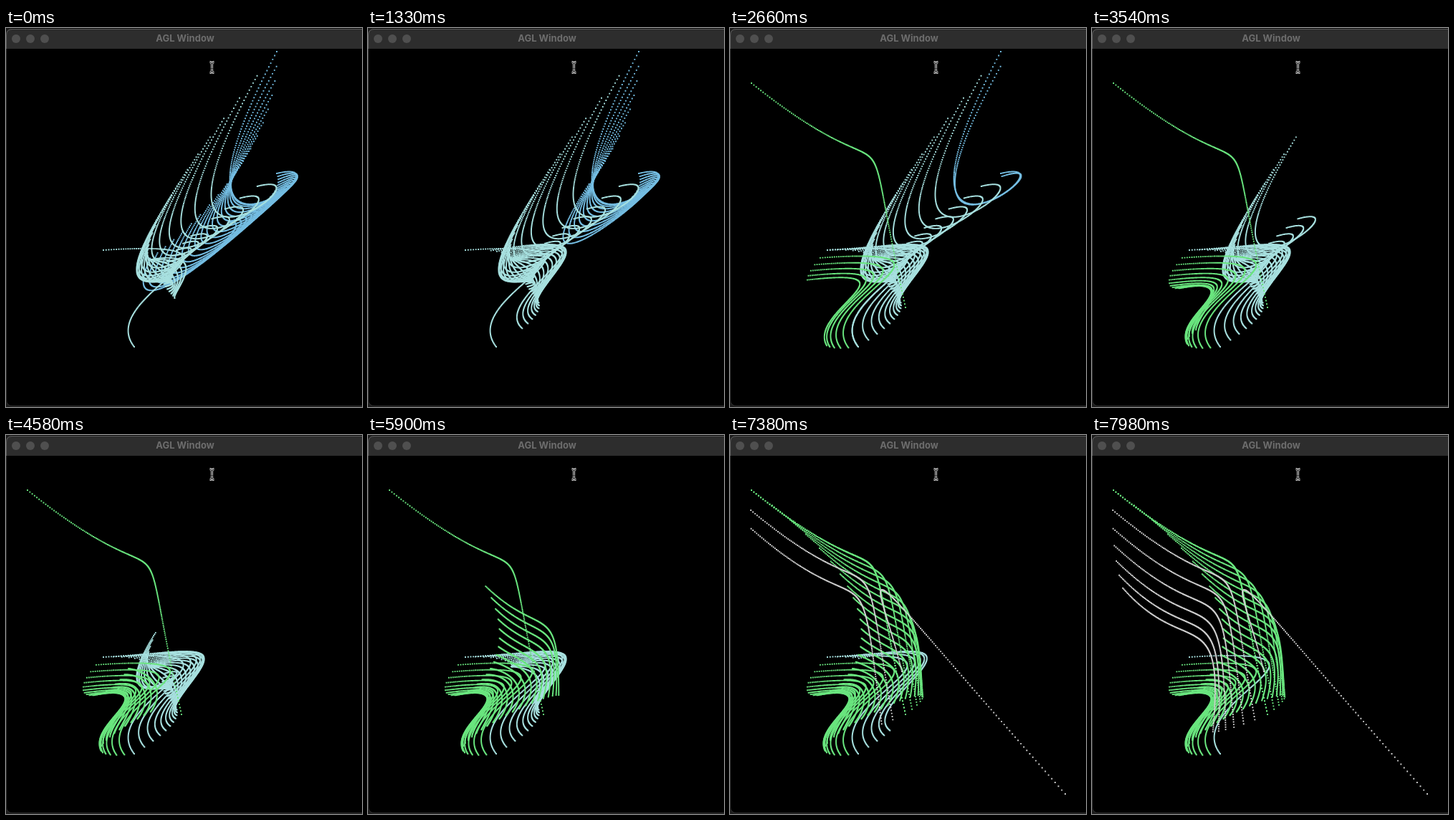
Recreate the animation shown at these times as an HTML page with a canvas. Size 497 px wide and 529 px high, loop 8 s.

```html
<!DOCTYPE html>
<html lang="en">
<head>
<meta charset="utf-8">
<title>AGL Window</title>
<style>
  html, body { margin: 0; width: 100%; height: 100%; overflow: hidden; background: #1c1c1c; }
  canvas, svg { position: absolute; left: 0; top: 0; display: block; }
  canvas { border-radius: 10px 0 0 10px; }
  text { font: 700 13px Inter, "Liberation Sans", sans-serif; fill: #6d6d6d; text-anchor: middle; }
</style>
</head>
<body>
<canvas id="stage" width="497" height="528"></canvas>
<svg width="497" height="529" viewBox="0 0 497 529" fill="none">
  <path d="M0 29V10Q0 1 9 1H497V29Z" fill="#2d2d2d"/>
  <path d="M497 527.5H9Q.5 527.5 .5 519V29" stroke="#303030"/>
  <path d="M.5 29V10Q.5 1.5 9 1.5H497" stroke="#606060"/>
  <g fill="#4f4f4f">
    <circle cx="14" cy="15" r="6"/><circle cx="34" cy="15" r="6"/><circle cx="54" cy="15" r="6"/>
  </g>
  <text x="250" y="19">AGL Window</text>
  <defs>
    <path id="beam" d="M284.5 47.5Q287.5 47.5 287.5 51Q287.5 47.5 290.5 47.5M287.5 51V59M286.5 56.5H288.5M284.5 62.5Q287.5 62.5 287.5 59Q287.5 62.5 290.5 62.5"/>
  </defs>
  <use href="#beam" stroke="#dcdcdc" stroke-width="3"/>
  <use href="#beam" stroke="#000"/>
</svg>
<script>
const LOOP = 8000, FIRST = 140, STEP = 147.7;
const TRAIL = 43;        // curves kept on screen
const PERIOD = 35;       // curves per colour
const OFFSET = 57;       // curves drawn before the loop begins
const DOTS = 200, SIZE = 1.9;
const COLORS = ["#74bde2", "#a7e0df", "#69e57e", "#cfcfcf"];
const CENTER = [248, 279];

// Four handles shape the curve. Each travels along chained Bézier legs:
// two bends, then a stop that also starts the next leg.
const handles = [
  [CENTER, [0, 440], [385, 270], [378, 33], [50, 430], [306, 302], [136, 310],
    [8, 440], [378, 322], [30, 77], [13, 408], CENTER, [468, 501]],
  [CENTER, [20, 600], [230, 368], [184, 400], [-110, 560], [462, 170], [391, 294],
    [38, 416], [279, 293], [254, 256], [-82, 417], CENTER, [148, 140]],
  [CENTER, [296, 394], [510, 94], [495, 175], [150, 370], [315, 388], [121, 371],
    [20, 452], [452, 372], [174, 68], [191, 467], CENTER, [200, 169]],
  [CENTER, [250, 300], [400, 250], [378, 203], [52, 415], [356, 332], [179, 445],
    [10, 465], [362, 300], [245, 390], [32, 482], CENTER, [240, 330]]
];

function bezier(points, t) {
  const s = 1 - t;
  const weights = [s * s * s, 3 * s * s * t, 3 * s * t * t, t * t * t];
  return [0, 1].map(axis => weights.reduce((sum, w, i) => sum + w * points[i][axis], 0));
}

// Every leg first shows its final curve, then sweeps towards it.
function makeCurve(index) {
  const leg = Math.floor(index / PERIOD);
  const progress = (index % PERIOD || PERIOD - 1) / (PERIOD - 1);
  const shape = handles.map(path => bezier(path.slice(leg * 3, leg * 3 + 4), progress));
  const dots = new Path2D();
  for (let i = 0; i <= DOTS; i++) {
    const [x, y] = bezier(shape, i / DOTS);
    dots.rect(x - SIZE / 2, y - SIZE / 2, SIZE, SIZE);
  }
  return { dots, color: COLORS[leg] };
}

const ctx = document.getElementById("stage").getContext("2d");
const curves = [];
const curveAt = index => curves[index] ||= makeCurve(index);

let shown = -1;
function draw(time) {
  const t = time % LOOP;
  const step = t < FIRST ? 0 : 1 + Math.floor((t - FIRST) / STEP);
  if (step === shown) return;
  shown = step;
  ctx.fillStyle = "#000";
  ctx.fillRect(0, 0, 497, 528);
  const head = step + OFFSET;
  for (let i = head - TRAIL + 1; i <= head; i++) {
    const { dots, color } = curveAt(i);
    ctx.fillStyle = color;
    ctx.fill(dots);
  }
}

const start = performance.now();
function tick() {
  draw(performance.now() - start);
  requestAnimationFrame(tick);
}
tick();
</script>
</body>
</html>
```
